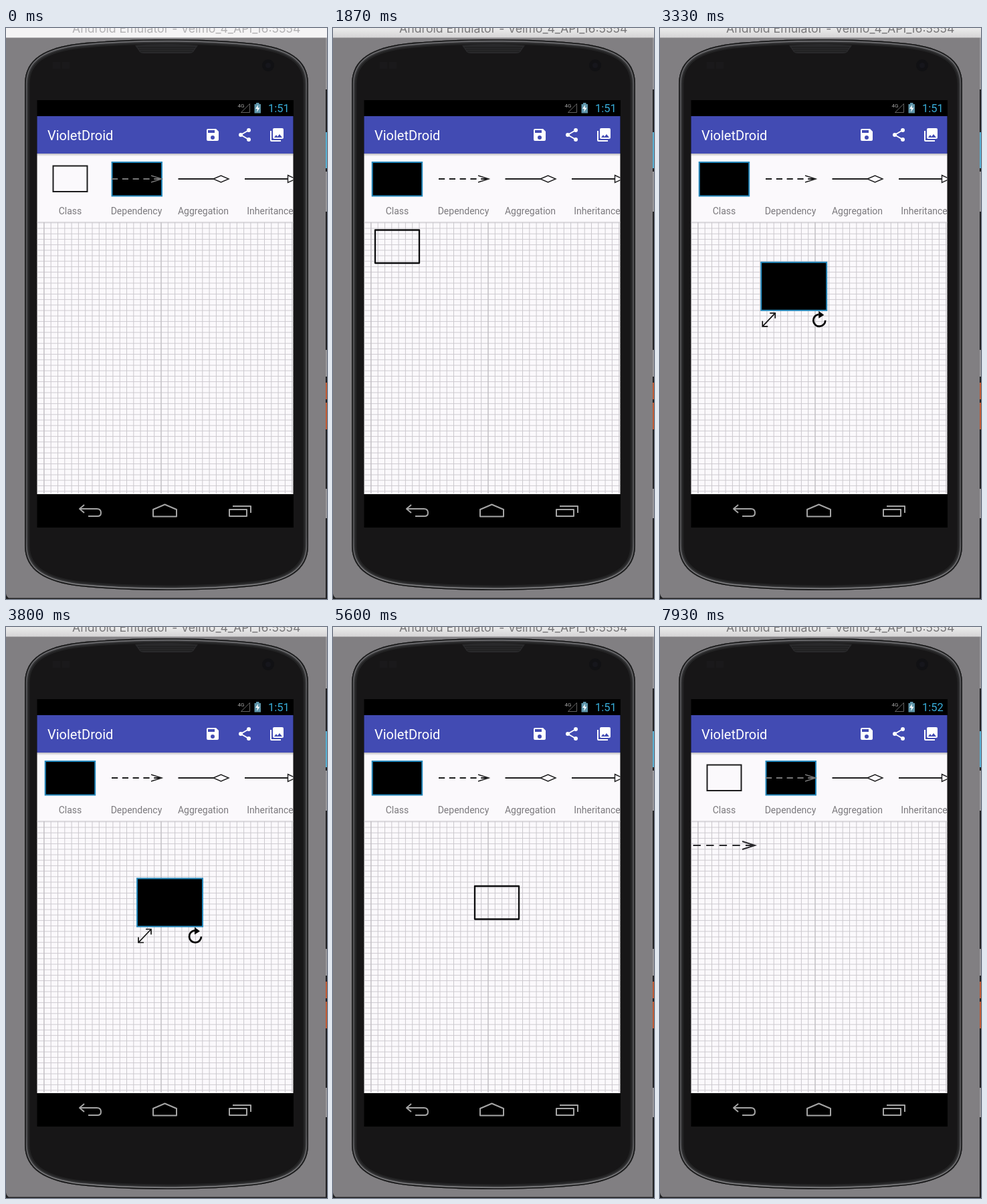
An HTML page that plays this animation: 480 px wide and 855 px high, repeating every 8000 ms.

```html
<!DOCTYPE html>
<html lang="en">
<head>
<meta charset="utf-8">
<title>VioletDroid</title>
<style>
  html, body { margin: 0; width: 100%; height: 100%; overflow: hidden; background: #817f82; }
  svg { display: block; width: 100%; height: 100%; }
  text { font-family: Roboto, sans-serif; }
  .line { fill: none; stroke: #1c1c1d; stroke-width: 2; }
  .thin { stroke-width: 1.4; }
  .nav { fill: none; stroke: #a5a5a5; stroke-width: 2; stroke-linejoin: round; }
  .pick { fill: #000; stroke: #2589bd; stroke-width: 2; }
  .label { font-size: 14px; fill: #7b797d; text-anchor: middle; }
</style>
</head>
<body>
<svg viewBox="0 0 480 855" preserveAspectRatio="none">
  <defs>
    <path id="body" d="M28 84C28 45 60 29 110 23C190 15 290 15 370 23C420 29 452 45 452 84V775C452 813 420 830 370 836C290 844 190 844 110 836C60 830 28 813 28 775Z"/>
    <clipPath id="inside"><use href="#body"/></clipPath>
    <linearGradient id="shine" gradientUnits="userSpaceOnUse" x1="0" x2="0" y1="17" y2="842">
      <stop offset="0" stop-color="#77777a"/><stop offset=".1" stop-color="#58585b"/>
      <stop offset=".9" stop-color="#58585b"/><stop offset="1" stop-color="#89898b"/>
    </linearGradient>
    <linearGradient id="drop" x2="0" y2="1">
      <stop offset="0" stop-color="#000" stop-opacity=".25"/><stop offset="1" stop-color="#000" stop-opacity="0"/>
    </linearGradient>
    <linearGradient id="focus" x2="0" y2="1">
      <stop offset="0" stop-color="#ececec"/><stop offset="1" stop-color="#d5d4d5"/>
    </linearGradient>
    <clipPath id="app"><path d="M46.500 132h383v566h-383z"/></clipPath>
    <clipPath id="canvas"><path d="M46.500 290h383v407h-383z"/></clipPath>
  </defs>

  <!-- Desktop and window -->
  <path fill="#817f82" d="M0 0h480v855H0z"/>
  <path fill="#202022" d="M478 14h2v841h-2zM0 853.5h480v1.5H0zM0 847q1 6 7 8H0z"/>
  <path fill="#58aed0" d="M478 156h2v54h-2z"/>
  <path fill="#bf5a35" d="M478 531h2v25h-2zM478 561h2v40h-2z"/>
  <path fill="#98979a" d="M478 14h2v78h-2zM478 215h2v60h-2zM478 482h2v40h-2zM478 690h2v44h-2z"/>
  <path id="bar" d="M0 0h480v14.5H0z"/>
  <text id="title" x="269.8" y="6.7" text-anchor="middle" style="font:17.7px Inter, sans-serif">Android Emulator - Velmo_4_API_16:5554</text>

  <!-- Phone: nested strokes form the rim -->
  <g clip-path="url(#inside)" fill="none">
    <use href="#body" fill="#171617"/>
    <use href="#body" stroke="#232324" stroke-width="15"/>
    <use href="#body" stroke="#39393b" stroke-width="10"/>
    <use href="#body" stroke="url(#shine)" stroke-width="6.5"/>
    <use href="#body" stroke="#1b1b1c" stroke-width="3.5"/>
  </g>
  <path fill="#29292b" d="M193 26Q240 22 287 26L280 36Q278 38 274 38H206Q202 38 200 36Z"/>
  <path stroke="#1a1a1b" d="M197 29h86M199 32h82M201 35h78"/>
  <circle cx="392" cy="56" r="9" fill="#111114"/>
  <circle cx="392" cy="56" r="4" fill="#16161c"/>
  <path fill="#1a191b" d="M70 51h11v10H70zM84 51h11v10H84z"/>

  <!-- Status bar -->
  <path d="M46.500 108H430V748H46.500z"/>
  <text x="346.5" y="118.5" font-size="8" fill="#a8a8a8">4G</text>
  <path d="M364.500 113.500v13h-13z" fill="none" stroke="#626262"/>
  <path fill="#5f96ab" d="M374 112h4.500v2h2.500v13.500h-9.500V114h2.500z"/>
  <path fill="#fff" d="M377 115l-4 6h3l-1 5 4.500-6.500h-3z"/>
  <text id="clock" x="392" y="126" font-size="16.5" fill="#38add9"></text>

  <g clip-path="url(#app)">
    <path fill="#fbf9fc" d="M46 188h384v510H46z"/>
    <path fill="#424bb3" d="M46 132h384v56H46z"/>
    <path fill="url(#drop)" d="M46 188h384v4H46z"/>
    <text x="62" y="168" font-size="20" fill="#fff">VioletDroid</text>
    <g fill="#fff" fill-rule="evenodd">
      <path transform="translate(297 148)" d="M17 3H5a2 2 0 0 0-2 2v14a2 2 0 0 0 2 2h14a2 2 0 0 0 2-2V7zM12 19a3 3 0 1 1 0-6a3 3 0 0 1 0 6zM15 9H5V5h10z"/>
      <g transform="translate(345 148)">
        <path d="M18 5L6 12L18 19" fill="none" stroke="#fff" stroke-width="2"/>
        <circle cx="18" cy="5" r="3"/><circle cx="6" cy="12" r="3"/><circle cx="18" cy="19" r="3"/>
      </g>
      <path transform="translate(393 148)" d="M22 16V4a2 2 0 0 0-2-2H8a2 2 0 0 0-2 2v12a2 2 0 0 0 2 2h12a2 2 0 0 0 2-2zM11 12l2 2.700L16 11l4 5H8zM2 6v14a2 2 0 0 0 2 2h14v-2H4V6z"/>
    </g>

    <!-- Palette -->
    <path class="line" d="M70.500 206.500h51v38.500h-51z"/>
    <rect id="pick" class="pick" y="201" width="74.500" height="50.500"/>
    <g id="depIcon" class="line">
      <path d="M158 226H232" stroke-dasharray="9.200 6.600"/>
      <path class="thin" d="M217 221L233 226L217 231"/>
    </g>
    <path class="line" d="M257.500 226H311"/>
    <path class="line thin" d="M310 226L321.500 221L333 226L321.500 231Z"/>
    <path class="line" d="M357 226H421"/>
    <path class="line thin" d="M421.500 220.500L433 226L421.500 231.500Z"/>
    <text class="label" x="96" y="279">Class</text>
    <text class="label" x="195" y="279">Dependency</text>
    <text class="label" x="295" y="279">Aggregation</text>
    <text class="label" x="395" y="279">Inheritance</text>

    <!-- Drawing area -->
    <g clip-path="url(#canvas)">
      <path id="rows" stroke="#cecbd0"/>
      <path id="cols" stroke="#cbc8cd"/>
      <path stroke="#bebbc0" d="M56.900 290V697M232 290V697"/>
      <path stroke="#dedce0" d="M46 290.500H430"/>
      <g id="box">
        <rect id="plain" x="-33" y="-24.500" width="66" height="49.500" fill="none" stroke="#0b0b0d" stroke-width="2.300" stroke-linejoin="round"/>
        <g id="active">
          <rect class="pick" x="-49" y="-36" width="98" height="72"/>
          <path fill="none" stroke="#111" stroke-width="1.700" d="M-47 60L-28 40M-47 52V60H-39M-36 40H-28V48"/>
          <path fill="none" stroke="#090909" stroke-width="2.800" d="M37 42A9 9 0 1 0 47 51"/>
          <path d="M37 37L45 43L37 48Z"/>
        </g>
      </g>
      <g id="arrow" fill="none" stroke="#29292c" stroke-width="2.200">
        <path d="M49.500 327H142" stroke-dasharray="11.400 8.200"/>
        <path d="M123 321L142 327L123 333" stroke-width="1.900"/>
      </g>
    </g>
  </g>

  <path class="nav" d="M117 714L110 720L117 726M111 720H136Q142 720 142 726Q142 731 137 731H123"/>
  <path class="nav" d="M220 721L237.500 713.500L255 721V731.500H220Z"/>
  <path class="nav" d="M334 721h26v10h-26zM339 716H366V726"/>
</svg>
<script>
const $ = id => document.getElementById(id);
const show = (id, on) => $(id).setAttribute('display', on ? 'inline' : 'none');
const LOOP = 8000, FOCUS = 1330, ADD_CLASS = 1530, GRAB = 2860, DROP = 3600,
      DESELECT = 5200, REMOVE = 6300, MINUTE = 7000, ADD_ARROW = 7600;

const steps = (from, to, gap, draw) => {
  let d = '';
  for (let p = from; p < to; p += gap) d += draw(p.toFixed(1));
  return d;
};
$('cols').setAttribute('d', steps(56.9, 430, 10.3, x => `M${x} 290V697`));
$('rows').setAttribute('d', steps(291.8, 697, 8.2, y => `M46 ${y}H430`));

function ease(t, a, b) {
  const u = Math.min(1, Math.max(0, (t - a) / (b - a)));
  return u * u * (3 - 2 * u);
}

function draw(t) {
  const focused = t >= FOCUS;
  $('bar').setAttribute('fill', focused ? 'url(#focus)' : '#f5f4f5');
  $('title').setAttribute('fill', focused ? '#79787a' : '#b3b2b4');
  $('clock').textContent = t < MINUTE ? '1:51' : '1:52';

  const classPicked = t >= ADD_CLASS && t < ADD_ARROW;
  $('pick').setAttribute('x', classPicked ? 58.7 : 158.5);
  $('depIcon').style.stroke = classPicked ? '' : '#777';

  const k = ease(t, GRAB, DROP);
  const active = t >= GRAB && t < DESELECT;
  show('box', t >= ADD_CLASS && t < REMOVE);
  $('box').setAttribute('transform', `translate(${96 + 149 * k} ${327 + 85.5 * k})`);
  show('plain', !active);
  show('active', active);
  show('arrow', t >= ADD_ARROW);
}

function tick() {
  draw(performance.now() % LOOP);
  requestAnimationFrame(tick);
}
tick();
</script>
</body>
</html>
```
